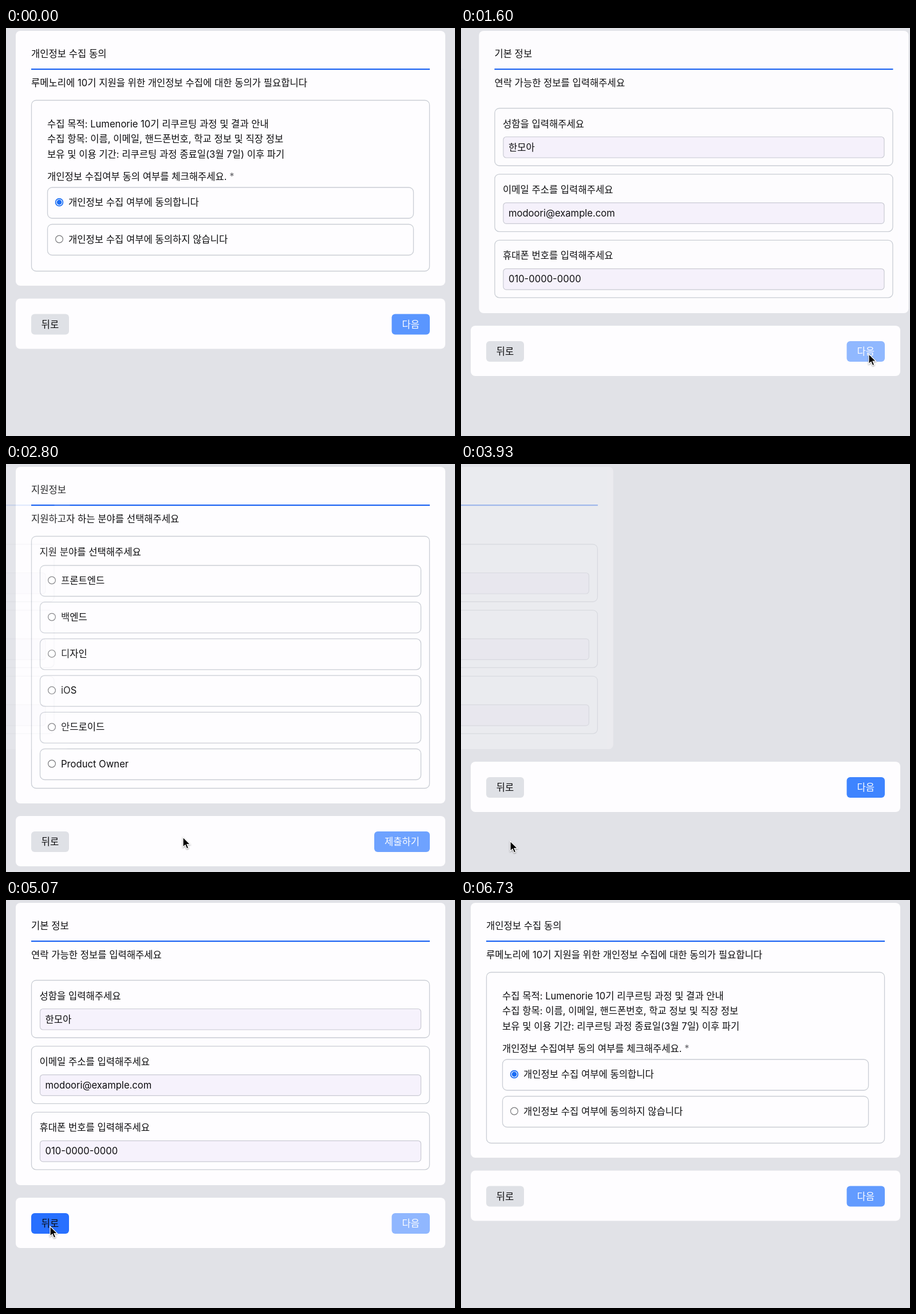
Recreate the animation shown at these times as an HTML page. Size 784 by 714 pixels, loop 6.8 s.

```html
<!DOCTYPE html>
<html lang="ko">
<head>
<meta charset="utf-8">
<style>
  html, body { margin: 0; width: 100%; height: 100%; overflow: hidden; background: #e1e2e7; }
  svg { display: block; }
  text { font: 16.6px Inter, "Noto Sans CJK KR", "Noto Sans CJK", sans-serif; fill: #0c0c0e; white-space: pre; }
  .card { fill: #fefdff; }
  .box { fill: none; stroke: #c9cdd4; stroke-width: 1.3; }
  .input { fill: #f6f2fc; stroke: #c9cad3; stroke-width: 1.2; }
  .ring { fill: #fff; stroke: #77777b; stroke-width: 1.2; }
  .on { stroke: #1a6df5; stroke-width: 1.7; }
  .dot { fill: #1a6df5; }
  .line { fill: #1a62f2; }
  .mid { text-anchor: middle; }
  .light { fill: #fff; }
  .star { fill: #66666a; }
  .main { fill: #2c79ff; }
</style>
</head>
<body>
<svg width="784" height="714" viewBox="0 0 784 714">
  <g id="pages"></g>
  <g id="footer">
    <rect class="card" x="17" y="0" width="750" height="88" rx="8"/>
    <rect id="back" x="44" y="27" width="66" height="36" rx="6"/>
    <text class="mid" x="77" y="51">뒤로</text>
    <g id="next">
      <rect class="main" y="27" height="36" rx="6"/>
      <text class="mid light" y="51"></text>
    </g>
  </g>
  <path id="cursor" d="M0 0V17.5L4 13.8L6.7 20.2L9.8 18.9L7.1 12.6H12.6Z" fill="#000" stroke="#fff"
    stroke-width="1.3" style="filter:drop-shadow(0 1px 1px #0006)"/>
</svg>
<script>
const $ = id => document.getElementById(id);
const LOOP = 6800, SLIDE = 1000, WIDTH = 750;

const rect = (cls, x, y, w, h, r = 8) =>
  `<rect class="${cls}" x="${x}" y="${y}" width="${w}" height="${h}" rx="${r}"/>`;
const text = (x, cy, s, cls = '') => `<text class="${cls}" x="${x}" y="${cy + 6}">${s}</text>`;
const radio = (x, y, on) => `<circle class="ring ${on ? 'on' : ''}" cx="${x}" cy="${y}" r="6.4"/>` +
  (on ? `<circle class="dot" cx="${x}" cy="${y}" r="4.4"/>` : '');
const option = (x, y, w, label, on) =>
  rect('box', x + .5, y + .5, w, 54) + radio(x + 21, y + 26.5, on) + text(x + 37, y + 26.5, label);
const field = (y, label, value) =>
  rect('box', 44.5, y + .5, 695, 100.5) + text(58.5, y + 27.5, label) +
  rect('input', 59.5, y + 50.5, 665, 36.5, 5) + text(68.5, y + 68.5, value);
const page = (h, title, note, body) =>
  `<g>${rect('card', 17, 5, WIDTH, h)}${text(44, 45, title)}${rect('line', 44, 71, 696, 2.2, 0)}` +
  `${text(44, 95.5, note)}${body}</g>`;

const consent = page(446, '개인정보 수집 동의',
  '루메노리에 10기 지원을 위한 개인정보 수집에 대한 동의가 필요합니다',
  rect('box', 44.5, 126.5, 695, 299) +
  text(72, 168, '수집 목적: Lumenorie 10기 리쿠르팅 과정 및 결과 안내') +
  text(72, 194, '수집 항목: 이름, 이메일, 핸드폰번호, 학교 정보 및 직장 정보') +
  text(72, 220.5, '보유 및 이용 기간: 리쿠르팅 과정 종료일(3월 7일) 이후 파기') +
  text(72, 259.5, '개인정보 수집여부 동의 여부를 체크해주세요. <tspan class="star">*</tspan>') +
  option(72, 278.5, 639, '개인정보 수집 여부에 동의합니다', true) +
  option(72, 343, 639, '개인정보 수집 여부에 동의하지 않습니다'));

const basics = page(494, '기본 정보', '연락 가능한 정보를 입력해주세요',
  field(140, '성함을 입력해주세요', '한모아') +
  field(255.3, '이메일 주소를 입력해주세요', 'modoori@example.com') +
  field(370.8, '휴대폰 번호를 입력해주세요', '010-0000-0000'));

const roles = ['프론트엔드', '백엔드', '디자인', 'iOS', '안드로이드', 'Product Owner'];
const apply = page(589, '지원정보', '지원하고자 하는 분야를 선택해주세요',
  rect('box', 44.5, 126.5, 695, 441) + text(58.5, 154, '지원 분야를 선택해주세요') +
  roles.map((r, i) => option(59, 177 + 64.2 * i, 665, r)).join(''));

// The last page comes first so that a leaving page passes over it.
$('pages').innerHTML = apply + consent + basics;
const [applyEl, consentEl, basicsEl] = $('pages').children;
const pages = [consentEl, basicsEl, applyEl];
const footerY = [473.5, 521, 616];
const STATIC = 2;

// Page changes: start, page left, page entered
const changes = [[780, 0, 1], [2217, 1, 2], [3715, 2, 1], [5088, 1, 0]];
const pulseRestart = 2217;

// Cursor: time, x, y of the tip
const path = [
  [270, 736, 505], [560, 716, 515], [800, 716, 515], [1250, 712, 570.5], [2260, 712, 570.5],
  [2800, 309, 653], [3300, 86, 660], [4200, 86, 660], [4450, 84, 674], [4860, 77, 571],
  [5180, 77, 571], [5520, -20, 634]
];

function bezier(x1, y1, x2, y2) {
  const at = (a, b, s) => 3 * (1 - s) ** 2 * s * a + 3 * (1 - s) * s * s * b + s ** 3;
  return x => {
    let lo = 0, hi = 1;
    for (let i = 0; i < 24; i++) {
      const s = (lo + hi) / 2;
      if (at(x1, x2, s) < x) lo = s; else hi = s;
    }
    return at(y1, y2, lo);
  };
}
const ease = bezier(.25, .1, .25, 1);
const soft = bezier(.4, 0, .6, 1);

function pulse(t) {
  const u = (t < pulseRestart ? t + 1530 : t - pulseRestart) % 2000 / 1000;
  return u < 1 ? 1 - soft(u) / 2 : .5 + soft(u - 1) / 2;
}

function cursorAt(t) {
  const i = path.findIndex(k => k[0] > t);
  if (i < 1) return null;
  const [a, b] = [path[i - 1], path[i]];
  const p = soft((t - a[0]) / (b[0] - a[0]));
  return [a[1] + (b[1] - a[1]) * p, a[2] + (b[2] - a[2]) * p];
}

function place(el, x, opacity) {
  el.setAttribute('transform', `translate(${x} 0)`);
  el.setAttribute('opacity', opacity);
}

function draw(t) {
  const change = changes.filter(c => c[0] <= t).pop();
  const [start, from, to] = change || [-SLIDE, 0, 0];
  const p = ease(Math.min(1, (t - start) / SLIDE));
  const dir = to > from ? 1 : -1;
  pages.forEach((el, i) => {
    if (i === to) i === STATIC ? place(el, 0, 1) : place(el, dir * WIDTH * (1 - p), change ? p : 1);
    else if (i === from && i !== STATIC) place(el, -dir * WIDTH * p, 1 - p);
    else place(el, 0, 0);
  });

  const top = footerY[to], last = to === STATIC;
  $('footer').setAttribute('transform', `translate(0 ${top})`);
  const [button, label] = $('next').children;
  const left = last ? 643 : 673.5;
  button.setAttribute('x', left);
  button.setAttribute('width', 740 - left);
  label.setAttribute('x', (left + 740) / 2);
  label.textContent = last ? '제출하기' : '다음';
  $('next').setAttribute('opacity', pulse(t));

  const c = cursorAt(t);
  $('cursor').style.display = c ? '' : 'none';
  if (c) $('cursor').setAttribute('transform', `translate(${c})`);
  const hover = c && c[0] > 44 && c[0] < 110 && c[1] > top + 27 && c[1] < top + 63;
  $('back').setAttribute('fill', hover ? '#2870ff' : '#dfe1e6');
}

const begin = performance.now();
function tick() {
  draw((performance.now() - begin) % LOOP);
  requestAnimationFrame(tick);
}
tick();
</script>
</body>
</html>
```
